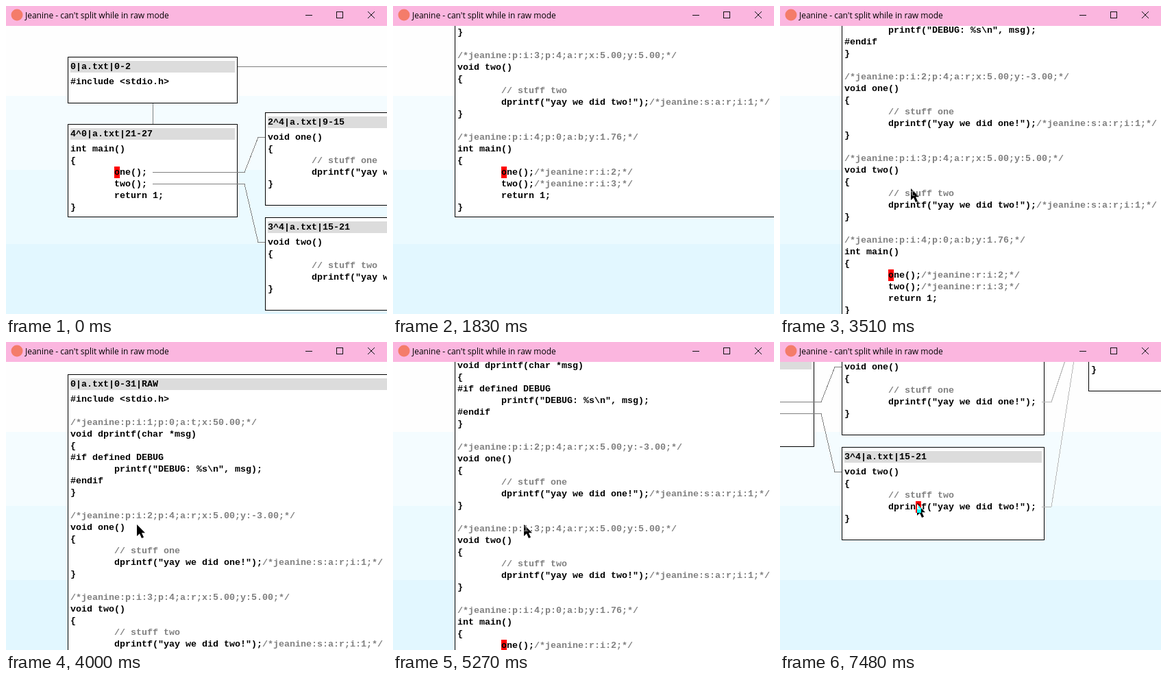
An HTML page that plays this animation: 556 by 449 pixels, repeating every 8 s.

```html
<!DOCTYPE html>
<html lang="en">
<head>
<meta charset="utf-8">
<title>Jeanine</title>
<style>
  html, body { margin: 0; width: 100%; height: 100%; overflow: hidden; background: #fff; }
  svg { display: block; }
  text { font: bold 13.333px "Liberation Mono", "DejaVu Sans Mono", monospace; white-space: pre; }
  .title { font: 12px "Open Sans", "Noto Sans", sans-serif; }
  .note { fill: #808080; }
  .box { fill: #fff; stroke: #000; }
  .head { fill: #dcdcdc; }
  .link { fill: none; stroke: #808080; }
  .link.pale { stroke: #b8b8b8; }
  .mark { fill: #f00; }
  .mark, .box, .head, .link, .crisp { shape-rendering: crispEdges; }

  #tree, #raw, #bar, #caret, #mouse, .mark { animation: 8s step-end infinite; }
  #tree { animation-name: tree; }
  #raw { animation-name: raw; }
  #bar { animation-name: bar; }
  #caret { animation-name: caret; }
  #mouse { animation-name: mouse; mix-blend-mode: difference; fill: #fff; }
  #tree .mark { animation-name: treeMark; }
  #raw .mark { animation-name: rawMark; }

  @keyframes tree {
    0% { opacity: 1; transform: translate(0, 0); }
    22.875% { opacity: 0; transform: translate(0, 0); }
    93.5%, 100% { opacity: 1; transform: translate(-288px, -155px); }
  }
  @keyframes treeMark {
    0% { opacity: 1; transform: translate(158px, 234px); }
    12.5% { opacity: 0; transform: translate(158px, 234px); }
    93.5%, 100% { opacity: 1; transform: translate(486px, 387px); }
  }
  /* the wheel scrolls 50px per notch */
  @keyframes raw {
    0% { opacity: 0; transform: translateY(0); }
    22.875% { opacity: 1; transform: translateY(0); }
    40.875% { opacity: 1; transform: translateY(50px); }
    41.625% { opacity: 1; transform: translateY(100px); }
    43.875% { opacity: 1; transform: translateY(150px); }
    44.625% { opacity: 1; transform: translateY(200px); }
    46.875% { opacity: 1; transform: translateY(250px); }
    50% { opacity: 1; transform: translateY(300px); }
    50.75% { opacity: 1; transform: translateY(350px); }
    52.25% { opacity: 1; transform: translateY(400px); }
    62.875% { opacity: 1; transform: translateY(350px); }
    63.625% { opacity: 1; transform: translateY(300px); }
    64.75% { opacity: 1; transform: translateY(250px); }
    65.875% { opacity: 1; transform: translateY(200px); }
    67% { opacity: 1; transform: translateY(150px); }
    68.125% { opacity: 1; transform: translateY(100px); }
    93.5%, 100% { opacity: 0; transform: translateY(100px); }
  }
  @keyframes rawMark {
    0% { opacity: 1; transform: translate(158px, 234px); }
    74.75% { opacity: 1; transform: translate(198px, 132px); }
    88%, 100% { opacity: 0; transform: translate(198px, 132px); }
  }
  @keyframes bar {
    0%, 22.875% { opacity: 0; }
    12.5%, 88% { opacity: 1; }
    93.5%, 100% { opacity: 0; }
  }
  @keyframes caret {
    0%, 88% { transform: translateX(12px); }
    16.625%, 89% { transform: translateX(20px); }
    17.375%, 90% { transform: translateX(28px); }
    20.5%, 92.75%, 100% { transform: translateX(36px); }
  }
  @keyframes mouse {
    0% { opacity: 0; transform: translate(69px, 268px); }
    37.875% { opacity: 1; transform: translate(69px, 268px); }
    38.625% { opacity: 1; transform: translate(120px, 267px); }
    39.375% { opacity: 1; transform: translate(170px, 266px); }
    40.125% { opacity: 1; transform: translate(191px, 266px); }
    72% { opacity: 1; transform: translate(194px, 258px); }
    72.75% { opacity: 1; transform: translate(198px, 245px); }
    73.75%, 100% { opacity: 1; transform: translate(200px, 236px); }
  }
</style>
</head>
<body>
<svg width="556" height="449" viewBox="0 0 556 449">
  <rect width="556" height="449" fill="#fefefe"/>
  <rect y="131" width="556" height="318" fill="#f4fcff"/>
  <rect y="239" width="556" height="210" fill="#ebfaff"/>
  <rect y="347" width="556" height="102" fill="#e2f7ff"/>

  <g id="tree"></g>
  <g id="raw"></g>

  <g id="bar">
    <rect class="box" x="2.5" y="426.5" width="551" height="20"/>
    <text x="4" y="440">:raw</text>
    <g id="caret" class="crisp">
      <rect y="428" width="32" height="17" fill="#fff"/>
      <rect y="428" width="8" height="17" fill="#0f0"/>
    </g>
  </g>

  <path id="mouse" d="M0 0V17L4 13.2L7 20L10 18.7L7 12.2H12Z"/>

  <rect width="556" height="29" fill="#fbb6df"/>
  <circle cx="16" cy="13" r="8.5" fill="#f47c6a"/>
  <text class="title" x="28" y="18">Jeanine - can't split while in raw mode</text>
  <g fill="none" stroke="#111">
    <path class="crisp" d="M437 13.5H447M482.5 8.5H491.5V17.5H482.5Z"/>
    <path d="M528 8L538 18M538 8L528 18"/>
  </g>
</svg>
<script>
const CHAR = 8, LINE = 17;

const source = String.raw`#include <stdio.h>

/*jeanine:p:i:1;p:0;a:t;x:50.00;*/
void dprintf(char *msg)
{
#if defined DEBUG
        printf("DEBUG: %s\n", msg);
#endif
}

/*jeanine:p:i:2;p:4;a:r;x:5.00;y:-3.00;*/
void one()
{
        // stuff one
        dprintf("yay we did one!");/*jeanine:s:a:r;i:1;*/
}

/*jeanine:p:i:3;p:4;a:r;x:5.00;y:5.00;*/
void two()
{
        // stuff two
        dprintf("yay we did two!");/*jeanine:s:a:r;i:1;*/
}

/*jeanine:p:i:4;p:0;a:b;y:1.76;*/
int main()
{
        one();/*jeanine:r:i:2;*/
        two();/*jeanine:r:i:3;*/
        return 1;
}`;
const rawLines = source.split("\n");
const plainLines = rawLines
  .filter(line => !line.startsWith("/*"))
  .map(line => line.replace(/\/\*.*/, ""));

function add(parent, tag, attrs, content = "") {
  const el = document.createElementNS("http://www.w3.org/2000/svg", tag);
  for (const key in attrs) el.setAttribute(key, attrs[key]);
  el.textContent = content;
  return parent.appendChild(el);
}

function addLine(parent, x, top, line) {
  const [, indent, code, note = ""] = line.match(/^( *)(.*?)(\/[*\/].*)?$/);
  const left = x + indent.length * CHAR;
  const y = top + 12;
  if (code) add(parent, "text", { x: left, y }, code);
  if (note) add(parent, "text", { x: left + code.length * CHAR, y, class: "note" }, note);
}

// Each panel: left, top, title, lines. The cursor lies between panels and text.
function addView(id, panels) {
  const view = document.getElementById(id);
  for (const { x, y, lines } of panels) {
    const columns = Math.max(30, ...lines.map(line => line.length + 1));
    const width = columns * CHAR + 8, height = lines.length * LINE + 34;
    add(view, "rect", { class: "box", x: x + .5, y: y + .5, width: width - 1, height: height - 1 });
    add(view, "rect", { class: "head", x: x + 4, y: y + 6, width: width - 8, height: LINE });
  }
  add(view, "rect", { class: "mark", width: CHAR, height: LINE });
  for (const { x, y, title, lines } of panels) {
    add(view, "text", { x: x + 4, y: y + 18 }, title);
    lines.forEach((line, i) => addLine(view, x + 4, y + 28 + i * LINE, line));
  }
  return view;
}

function panel(x, y, id, from, to) {
  return { x, y, title: `${id}|a.txt|${from}-${to}`, lines: plainLines.slice(from, to) };
}

// From the end of a call, past its panel's right side, to the first line of another.
function addCall(view, x, y, right, left, endY, kind = "") {
  const d = `M${x} ${y + .5}H${right + 10}L${left - 10} ${endY + .5}H${left}`;
  add(view, "path", { class: "link " + kind, d });
}

const tree = addView("tree", [
  panel(90, 74, "0", 0, 2),
  panel(738, 74, "1^0", 2, 9),
  panel(378, 155, "2^4", 9, 15),
  panel(378, 308, "3^4", 15, 21),
  panel(90, 172, "4^0", 21, 27),
]);
add(tree, "path", { class: "link", d: "M214.5 142V172M338 88.5H738" });
addCall(tree, 214, 242, 338, 378, 191);
addCall(tree, 214, 259, 338, 378, 344);
addCall(tree, 670, 242, 674, 738, 110, "pale");
addCall(tree, 670, 395, 674, 738, 110, "pale");

addView("raw", [{ x: 90, y: -253, title: "0|a.txt|0-31|RAW", lines: rawLines }]);
</script>
</body>
</html>
```
